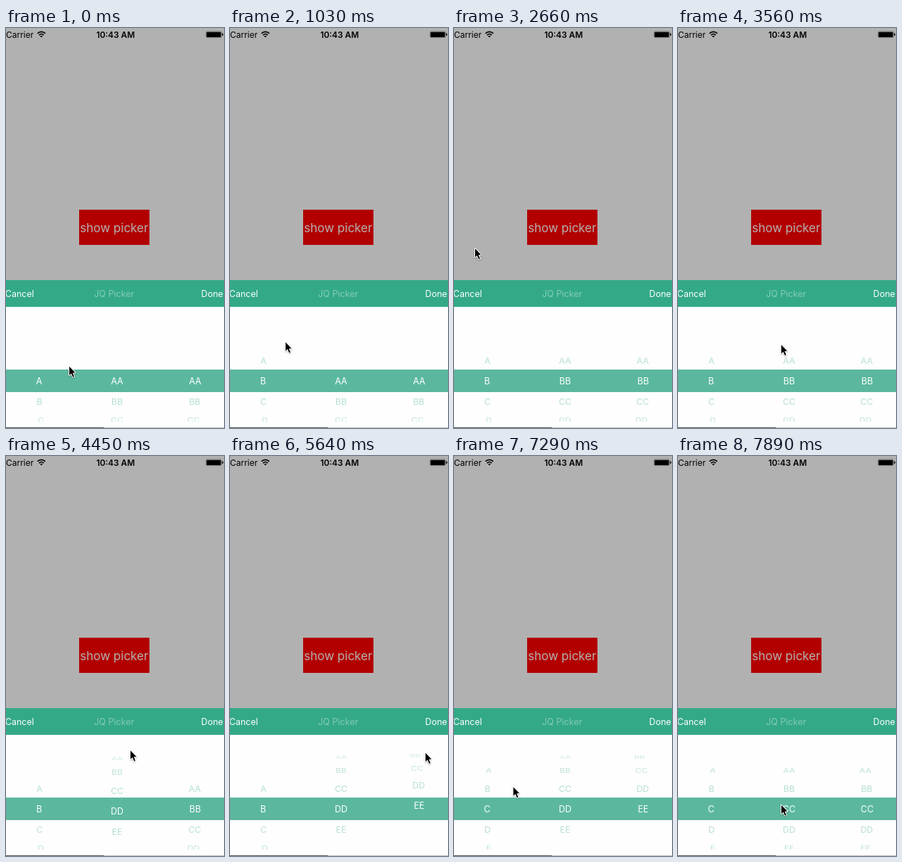
An HTML page with a canvas for the animation above (8 s loop, 310 px wide and 568 px high).

```html
<!DOCTYPE html>
<html lang="en">
<head>
<meta charset="utf-8">
<title>Picker</title>
<style>
  html, body { margin: 0; width: 100%; height: 100%; overflow: hidden; background: #b1b1b1; }
  canvas { display: block; width: 310px; height: 568px; }
</style>
</head>
<body>
<canvas id="stage"></canvas>
<script>
const W = 310, H = 568, LOOP = 8000;
const STEP = 148.8, LEAD = 20; // screen refresh in ms
const GREEN = '#33a987';
const BAND = { top: 485, height: 32, mid: 501.4 };
const WHEEL = { top: 396, floor: 559, radius: 85, angle: Math.PI / 9, depth: 900, center: 158 };
const COLUMN_GAP = 111;
const ROWS = [...'ABCDE'];

// Each drag turns one column to a row; the columns right of it then follow.
const DRAG_STEPS = 5, FOLLOW_DELAY = 6, FOLLOW_STEPS = 3;
const drags = [
  { column: 0, start: 1, row: 1 },
  { column: 1, start: 26, row: 3 },
  { column: 2, start: 35, row: 4 },
  { column: 0, start: 44, row: 2 }
];

// Turning points of the pointer: [step, x, y]
const pointerPath = [
  [0, 89.5, 479.5], [7, 78.5, 445], [11, 31, 413], [17, 31, 413],
  [18, 29.5, 312], [26, 168, 474], [30, 176.5, 417], [33, 135, 445],
  [36, 272, 478], [38, 277.5, 420.5], [44, 64.5, 485.5], [47, 62, 460], [53, 146.5, 494.5]
];

const canvas = document.getElementById('stage');
const ctx = canvas.getContext('2d');
const ratio = window.devicePixelRatio || 1;
canvas.width = W * ratio;
canvas.height = H * ratio;

const clamp = p => Math.min(1, Math.max(0, p));
const easeOut = p => 1 - Math.pow(1 - p, 1.75);
const easeInOut = p => p * p * (3 - 2 * p);
const mix = (a, b, p) => a + (b - a) * p;

function rowAt(column, step) {
  let row = 0;
  for (const drag of drags) {
    if (column === drag.column) {
      const p = clamp((step - drag.start) / DRAG_STEPS);
      row = mix(row, drag.row, easeOut(p));
      // the wheel springs back after its last row
      if (drag.row === ROWS.length - 1) row += 0.37 * Math.sin(Math.PI * p);
    } else if (column > drag.column) {
      const p = clamp((step - drag.start - FOLLOW_DELAY) / FOLLOW_STEPS);
      row = mix(row, drag.row, easeInOut(p));
    }
  }
  return row;
}

function pointerAt(step) {
  const next = Math.max(1, pointerPath.findIndex(([s]) => s >= step));
  const [s0, x0, y0] = pointerPath[next - 1];
  const [s1, x1, y1] = pointerPath[next];
  const p = easeInOut(clamp((step - s0) / (s1 - s0)));
  return [mix(x0, x1, p), mix(y0, y1, p)];
}

function box(x, y, w, h, color) {
  ctx.fillStyle = color;
  ctx.fillRect(x, y, w, h);
}

function roundBox(x, y, w, h, r) {
  ctx.beginPath();
  ctx.roundRect(x, y, w, h, r);
}

// y is the middle of the capitals
function label(text, x, y, size, color, align = 'center', weight = 400) {
  ctx.font = `${weight} ${size}px Inter, sans-serif`;
  ctx.textAlign = align;
  ctx.fillStyle = color;
  ctx.fillText(text, x, y + size * 0.364);
}

function clipped(top, bottom, draw) {
  ctx.save();
  ctx.beginPath();
  ctx.rect(0, top, W, bottom - top);
  ctx.clip();
  draw();
  ctx.restore();
}

function drawWifi(x, y) {
  const from = -Math.PI * 0.75, to = -Math.PI * 0.25;
  ctx.strokeStyle = ctx.fillStyle = '#000';
  ctx.lineWidth = 1.7;
  for (const r of [4.7, 8]) {
    ctx.beginPath();
    ctx.arc(x, y, r, from, to);
    ctx.stroke();
  }
  ctx.beginPath();
  ctx.moveTo(x, y);
  ctx.arc(x, y, 2.6, from, to);
  ctx.fill();
}

function drawBattery() {
  ctx.strokeStyle = 'rgba(0,0,0,.45)';
  ctx.fillStyle = '#000';
  ctx.lineWidth = 0.7;
  roundBox(284.4, 4.9, 22, 8.8, 1.8);
  ctx.stroke();
  roundBox(285.2, 5.7, 20.4, 7.2, 1);
  ctx.fill();
  roundBox(307.2, 7.6, 1.5, 3.4, 0.7);
  ctx.fill();
}

function drawStatus() {
  label('Carrier', 0, 9.3, 12, '#000', 'left');
  label('10:43 AM', 155.8, 9.3, 11.9, '#000', 'center', 600);
  drawWifi(50.3, 13.4);
  drawBattery();
}

function drawRow(column, turn, text, selected) {
  const flat = Math.cos(turn);
  const scale = 1 / (1 + WHEEL.radius * (1 - flat) / WHEEL.depth);
  ctx.save();
  ctx.translate(
    WHEEL.center + (column - 1) * COLUMN_GAP * scale,
    BAND.mid + WHEEL.radius * Math.sin(turn));
  ctx.scale(scale, flat);
  if (!selected) ctx.globalAlpha = 0.38 * Math.pow(flat, 0.8);
  label(text, 0, 0, 12.5, selected ? '#fff' : GREEN);
  ctx.restore();
}

function drawRows(step, selected) {
  for (let column = 0; column < 3; column++) {
    const row = rowAt(column, step);
    ROWS.forEach((letter, i) => {
      const turn = (i - row) * WHEEL.angle;
      const text = column === 0 ? letter : letter + letter;
      if (Math.abs(turn) < 1.3) drawRow(column, turn, text, selected);
    });
  }
}

function drawPicker(step) {
  const bandEnd = BAND.top + BAND.height;
  box(0, 358, W, WHEEL.top - 358, GREEN);
  label('Cancel', -1.2, 377.3, 12.5, '#fff', 'left');
  label('JQ Picker', 153.7, 377.6, 12.5, '#85cbb7');
  label('Done', 308.8, 377.3, 12.5, '#fff', 'right');

  box(0, WHEEL.top, W, H - WHEEL.top, '#fefefe');
  clipped(WHEEL.top, BAND.top, () => drawRows(step, false));
  clipped(bandEnd, WHEEL.floor, () => drawRows(step, false));
  box(0, BAND.top, W, BAND.height, '#5bb89e');
  clipped(BAND.top, bandEnd, () => drawRows(step, true));

  box(0, 567, 139, 1, '#555');
  box(139, 567, W - 139, 1, '#c0c0c0');
}

function drawPointer(step) {
  const outline = [[0.5, 1.2], [0.5, 13.6], [3.3, 11], [5.7, 16.2], [7.5, 15.4], [5.2, 10.2], [9, 9.9]];
  ctx.save();
  ctx.translate(...pointerAt(step));
  ctx.beginPath();
  outline.forEach(([x, y]) => ctx.lineTo(x, y));
  ctx.closePath();
  ctx.lineJoin = 'round';
  ctx.lineWidth = 2;
  ctx.strokeStyle = '#fff';
  ctx.shadowColor = 'rgba(0,0,0,.3)';
  ctx.shadowBlur = 2 * ratio;
  ctx.shadowOffsetY = ratio;
  ctx.stroke();
  ctx.shadowColor = 'transparent';
  ctx.fillStyle = '#000';
  ctx.fill();
  ctx.restore();
}

function render(time) {
  const step = Math.floor((time % LOOP + LEAD) / STEP);
  ctx.setTransform(ratio, 0, 0, ratio, 0, 0);
  box(0, 0, W, H, '#b1b1b1');
  drawStatus();
  box(104, 258, 100, 50, '#b20000');
  label('show picker', 153.8, 283.8, 17, '#b6aeae');
  drawPicker(step);
  drawPointer(step);
}

const start = performance.now();
function tick() {
  render(performance.now() - start);
  requestAnimationFrame(tick);
}
tick();
</script>
</body>
</html>
```
